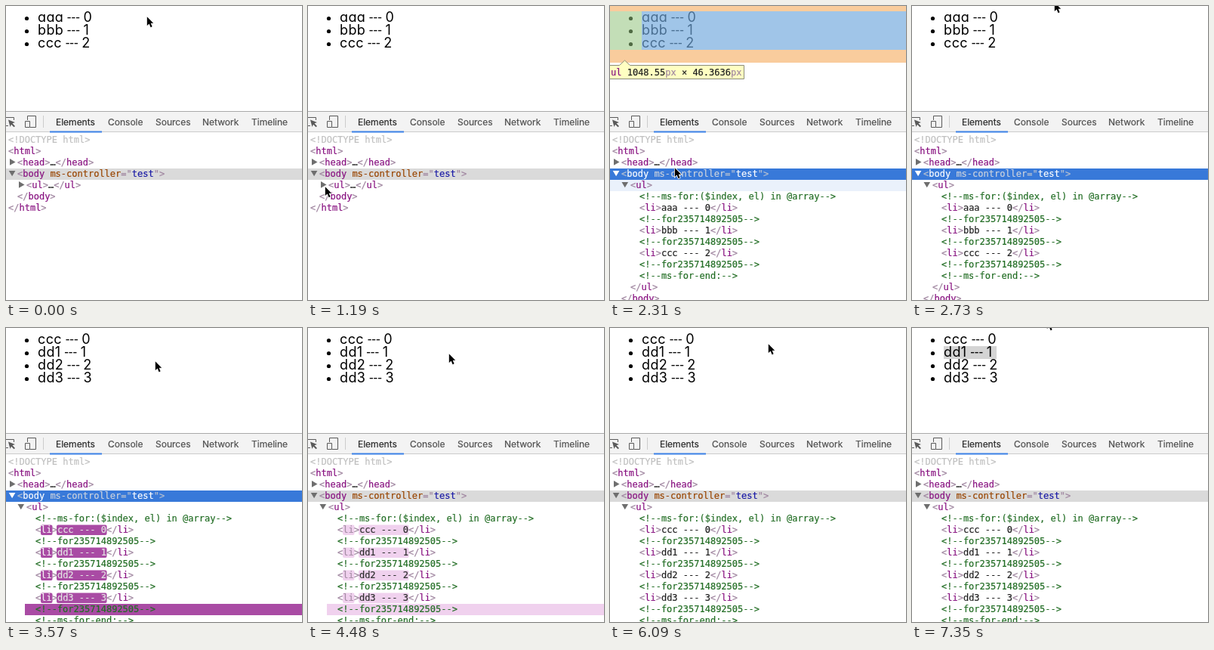
These frames come from a looping animation (392 by 389 pixels, 7.7 s). An HTML page:

```html
<!DOCTYPE html>
<html lang="en">
<head>
<meta charset="utf-8">
<title>List inspector</title>
<style>
html, body { margin: 0; width: 100%; height: 100%; overflow: hidden; background: #fff; }
svg { display: block; }
text { white-space: pre; fill: currentColor; stroke: currentColor; stroke-width: .2px; }
.page { font: 400 18px Inter, sans-serif; font-feature-settings: "cv11"; letter-spacing: .4px; }
.page text { stroke: none; }
.dash { font: 17.6px "Open Sans", sans-serif; letter-spacing: 0; }
.tabs { font: 12px Inter, sans-serif; color: #505050; }
.dom, .tip { font: 12px "DejaVu Sans Mono", monospace; color: #222; }
.b { color: #a086a0; }
.n { color: #881280; }
.a { color: #994500; }
.v { color: #1a1aa6; }
.c { color: #236e25; }
.d { color: #c0c0c0; }
.icon { fill: none; stroke: #5a5a5a; }
.arrow { fill: #6e6e6e; }
.focus .b { color: #b4bfd0; }
.focus .n, .focus .v { color: #fff; }
.focus .a { color: #ccd3dd; }
.focus .arrow { fill: #fff; }
</style>
</head>
<body>
<svg id="stage" width="392" height="389" viewBox="0 0 392 389"></svg>
<script>
const LOOP = 7700, STEP = 70;
const FLASH = 3430, FLASH_LEN = 1400;

const esc = s => s.replace(/</g, '&lt;').replace(/>/g, '&gt;');
const span = (cls, s) => `<tspan class="${cls}">${esc(s)}</tspan>`;
const rect = (x, y, w, h, extra) => `<rect x="${x}" y="${y}" width="${w}" height="${h}" ${extra}/>`;
const text = (x, y, body, cls = '') => `<text x="${x}" y="${y}" class="${cls}">${body}</text>`;
const group = (id, body, cls = '') => `<g id="${id}" class="${cls}">${body}</g>`;

// DOM tree rows
const rowTop = row => 170 + row * 15;
const line = (row, x, body) => text(x, rowTop(row) + 11, body);
const open = (name, cls = 'n') => span('b', '<') + span(cls, name) + span('b', '>');
const shut = name => span('b', '</') + span('n', name) + span('b', '>');
const right = (x, row) => `<path class="arrow" d="M${x} ${rowTop(row) + 2}l7.5 4.4l-7.5 4.4z"/>`;
const down = (x, row) => `<path class="arrow" d="M${x} ${rowTop(row) + 3}h8.6l-4.3 7.2z"/>`;

function listTree(words, flash) {
  let row = 5, out = down(15.5, 4) + line(4, 27, open('ul'));
  const comment = s => line(row++, 39, span('c', `<!--${s}-->`));
  out += comment('ms-for:($index, el) in @array');
  words.forEach((word, i) => {
    const y = rowTop(row) + .5;
    if (flash) {
      out += rect(46, y, 15.5, 13.5, 'class="hl" rx="2"') + rect(67, y, 66.5, 13.5, 'class="hl" rx="2"');
    }
    out += line(row++, 39, open('li', flash ? 'n hot-tag' : 'n')
      + span(flash ? 'hot-text' : '', `${word} --- ${i}`) + shut('li'));
    if (flash && i === words.length - 1) out += rect(25, rowTop(row), 367, 15, 'class="hl"');
    out += comment('for235714892505');
  });
  out += comment('ms-for-end:');
  return out + line(row, 27, shut('ul')) + line(row + 1, 15, shut('body'));
}

const pageList = words => words.map((word, i) => {
  const y = 21 + 17 * i;
  return `<circle cx="27.5" cy="${y - 4.5}" r="2.6"/>` + text(42, y, word + span('dash', ' --- ') + i);
}).join('');

const before = ['aaa', 'bbb', 'ccc'], after = ['ccc', 'dd1', 'dd2', 'dd3'];

const overlay = rect(0, 0, 392, 7, 'fill="#f6b26ba8"') + rect(0, 58, 392, 17, 'fill="#f6b26ba8"')
  + rect(0, 7, 42, 51, 'fill="#93c47d8c"') + rect(42, 7, 350, 51, 'fill="#6fa8dca8"')
  + '<path d="M-2 78.5H12.5L19.5 72L26.5 78.5H177.5V96.5H-2z" fill="#ffffc2" stroke="#8c8c78"/>'
  + text(1, 92, span('n', 'ul') + ' 1048.55' + span('b', 'px') + ' × 46.3636' + span('b', 'px'), 'tip');

const tabs = [[66, 'Elements'], [135, 'Console'], [198, 'Sources'], [260, 'Network'], [325, 'Timeline']];
const toolbar = rect(0, 139, 392, 28, 'fill="#f3f3f3"')
  + rect(0, 139, 392, 1, 'fill="#a9a9a9"') + rect(0, 166, 392, 1, 'fill="#ccc"')
  + rect(58, 165.5, 69, 2, 'fill="#3b80e6"') + rect(49, 145, 1, 16, 'fill="#ccc"')
  + '<path class="icon" d="M0 147.5H10.5V151M0 158.5H3"/><path d="M3 150.5L12 154L8.5 155.3L12 159L10.5 160.3L7 156.7L5.5 160z" fill="#5a5a5a"/>'
  + '<path class="icon" d="M28.5 151V145.5H39.5V160.5H32M25.5 152.5H31.5V160.5H25.5z"/>'
  + group('tabs', tabs.map(([x, s], i) => text(x, 158, i ? s : `<tspan color="#2a2a2a">${s}</tspan>`)).join(''), 'tabs');

const bodyRow = rect(0, 215, 392, 15, 'id="bar"') + down(3.8, 3)
  + line(3, 15, span('b', '<') + span('n', 'body') + ' ' + span('a', 'ms-controller')
    + span('b', '="') + span('v', 'test') + span('b', '">'));

const stage = document.getElementById('stage');
stage.innerHTML = rect(0, 0, 392, 389, 'fill="#fff"')
  + rect(42, 24, 70, 17, 'id="pick"')
  + group('page3', pageList(before), 'page') + group('page4', pageList(after), 'page')
  + group('overlay', overlay) + toolbar
  + group('dom',
      line(0, 3, span('d', '<!DOCTYPE html>')) + line(1, 3, open('html'))
      + right(5, 2) + line(2, 15, open('head') + '…' + shut('head'))
      + group('body', bodyRow)
      + rect(0, 230, 392, 15, 'id="hover" fill="#3879d91a"')
      + group('closed', right(17, 4) + line(4, 27, open('ul') + '…' + shut('ul'))
        + line(5, 15, shut('body')) + line(6, 3, shut('html')))
      + group('tree3', listTree(before)) + group('tree4', listTree(after, true)), 'dom')
  + '<path id="cursor" d="M.8 1.2V13L3.6 10.5L5.6 15.2L7.6 14.3L5.7 9.8H9.2z" stroke="#fff" stroke-width="1.6" paint-order="stroke"/>';

// Cursor moves: start ms, end ms, x, y; it rests in between
const home = [186, 13];
const moves = [
  [0, 630, 38, 255], [630, 840, 15, 239], [910, 1190, 22, 238], [1540, 1820, 17, 237], [1890, 1960, 17, 233],
  [1960, 2310, 85, 213], [2310, 2730, 188, -6], [3150, 3570, 197, 43], [3570, 4480, 186, 33], [4480, 4830, 195, 21],
  [4830, 4970, 201, 5], [5040, 5390, 207, 21], [5530, 5740, 209, 20], [6020, 6510, 200, 24],
  [6580, 7000, 191, 0], [7070, 7350, 178, -12]
];

const clamp = k => Math.min(Math.max(k, 0), 1);
const ease = k => k * k * (3 - 2 * k);
const mix = (a, b, k) => a.map((v, i) => v + (b[i] - v) * k);
const cursorAt = t => moves.reduce(
  (pos, [from, to, x, y]) => mix(pos, [x, y], ease(clamp((t - from) / (to - from)))), home);

const el = id => document.getElementById(id);
const show = (id, on) => { el(id).style.display = on ? '' : 'none'; };
const rgb = (c, alpha = 1) => `rgba(${c.map(Math.round)},${alpha})`;
const paint = (cls, prop, color) => stage.querySelectorAll(cls).forEach(e => { e.style[prop] = color; });

function flashAt(t) {
  const p = (t - FLASH) / FLASH_LEN, live = p >= 0 && p < 1;
  const k = clamp(p / .8), white = [255, 255, 255];
  const alpha = live ? Math.min(1, (1 - p) / .2) : 0;
  paint('.hl', 'fill', rgb(mix([158, 54, 153], [245, 219, 244], k), alpha));
  paint('.hot-tag', 'color', live ? rgb(mix(white, [160, 134, 160], k)) : '');
  paint('.hot-text', 'color', live ? rgb(mix(white, [34, 34, 34], k)) : '');
}

function draw(t) {
  const changed = t >= FLASH, opened = t >= 1960;
  const hover = t >= 1400 && t < 2520, focus = t >= 1680 && t < 3850;
  show('page3', !changed);
  show('page4', changed);
  show('closed', !opened);
  show('tree3', opened && !changed);
  show('tree4', changed);
  show('overlay', hover);
  show('hover', hover);
  el('body').setAttribute('class', focus ? 'focus' : '');
  el('bar').style.fill = focus ? '#3879d9' : '#dadada';
  show('pick', t >= 6300);
  el('pick').style.fill = t < 7210 ? '#b3d7fe' : '#d4d4d4';
  flashAt(t);
  const [x, y] = cursorAt(t);
  el('cursor').setAttribute('transform', `translate(${Math.round(x)} ${Math.round(y)})`);
}

const start = performance.now();
function tick() {
  const t = (performance.now() - start) % LOOP;
  draw(Math.floor(t / STEP) * STEP);
  requestAnimationFrame(tick);
}
tick();
</script>
</body>
</html>
```
